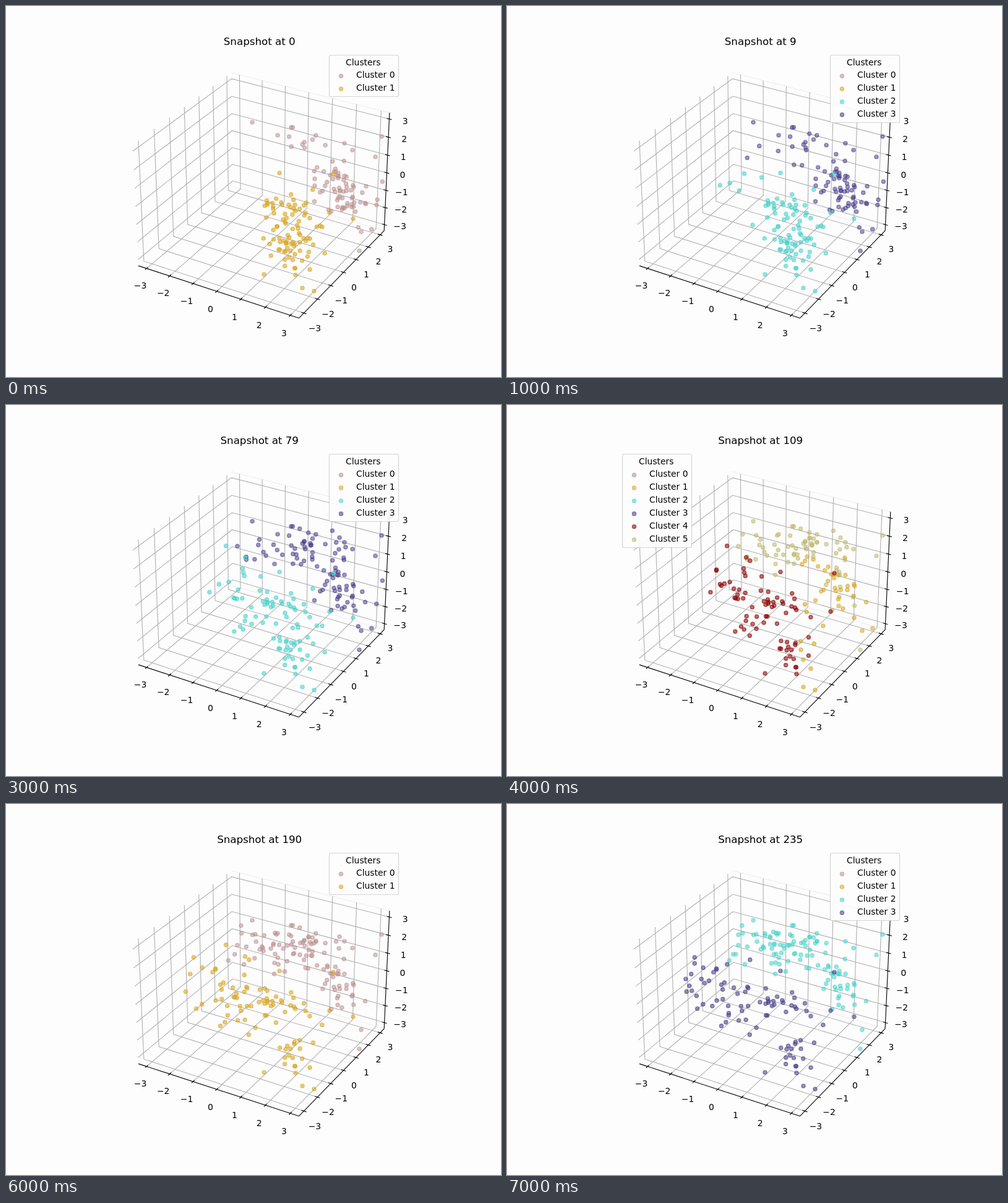
Write an HTML page that moves like this. It is 800x600 px and loops after 8000 ms.

```html
<!DOCTYPE html>
<html lang="en">
<head>
<meta charset="utf-8">
<title>Cluster snapshots</title>
<style>
html, body { margin: 0; width: 100%; height: 100%; overflow: hidden; background: #fdfdfd; }
svg { display: block; width: 800px; height: 600px; }
text { font: 13.89px "DejaVu Sans", sans-serif; fill: #000; }
.title { font-size: 16.67px; }
.grid { stroke: #b0b0b0; stroke-width: 1.11; fill: none; }
.pane { stroke: #efefef; stroke-width: 1.2; fill: none; }
.axis { stroke: #000; stroke-width: 1.11; fill: none; }
</style>
</head>
<body>
<svg viewBox="0 0 800 600">
  <g id="axes"></g>
  <g id="dots"></g>
  <g id="legend"></g>
  <text id="title" class="title" x="409.7" y="63" text-anchor="middle"></text>
</svg>
<script>
const STEP = 1000;
const colors = ["#bc8f8f", "#daa520", "#48d1cc", "#483d8b", "#8b0000", "#bdb76b"];

// Per snapshot: label and cluster of the upper, lower and right-hand group
const shots = [
  { at: 0, up: 0, low: 1 },
  { at: 9, up: 3, low: 2 },
  { at: 39, up: 4, low: 1 },
  { at: 79, up: 3, low: 2 },
  { at: 109, up: 5, low: 4, right: 1 },
  { at: 146, up: 3, low: 2 },
  { at: 190, up: 0, low: 1 },
  { at: 235, up: 2, low: 3 }
];

const byId = id => document.getElementById(id);
const line = (cls, ...pts) =>
  `<polyline class="${cls}" points="${pts.map(p => p.map(v => v.toFixed(2)).join()).join(" ")}"/>`;
const label = (s, x, y, anchor = "middle") => `<text x="${x}" y="${y}" text-anchor="${anchor}">${s}</text>`;
const dot = (x, y, c, a) =>
  `<circle cx="${x.toFixed(1)}" cy="${y.toFixed(1)}" r="3.1" fill="${c}" stroke="${c}" ` +
  `stroke-width="1.39" fill-opacity="${a}" stroke-opacity="${a}"/>`;

// ---- Axes: perspective view of a box with sides from -0.5 to 0.5 ----
const WIDE = 1.19, TALL = 0.893, DIST = 10, SCALE = 2497;
const rad = Math.PI / 180;
const [ce, se] = [Math.cos(30 * rad), Math.sin(30 * rad)];
const [ca, sa] = [Math.cos(-60 * rad), Math.sin(-60 * rad)];

function project([x, y, z]) {
  x *= WIDE; y *= WIDE; z *= TALL;
  const out = x * ca + y * sa;
  const k = SCALE / (DIST - out * ce - z * se);
  return [416.2 + (y * ca - x * sa) * k, 296.8 - (z * ce - out * se) * k];
}

const shift = (p, dir, d) => p.map((v, i) => v + dir[i] * d);
const h = 0.5;
// Path of a grid line at f, tick direction, label direction
const axes = [
  { path: f => [[f, -h, -h], [f, h, -h], [f, h, h]], tick: [0, 1, 0], out: [0, -1, -1] },
  { path: f => [[h, f, -h], [-h, f, -h], [-h, f, h]], tick: [1, 0, 0], out: [1, 0, -1] },
  { path: f => [[h, h, f], [-h, h, f], [-h, -h, f]], tick: [1, 0, 0], out: [1, 1, 0] }
];

function drawAxes() {
  let grid = "", marks = "", names = "";
  for (const { path, tick, out } of axes) {
    marks += line("axis", project(path(-h)[0]), project(path(h)[0]));
    for (let v = -3; v <= 3; v++) {
      const pts = path((v + 3.36) / 6.7 - h);
      grid += line("grid", ...pts.map(project));
      marks += line("axis", project(shift(pts[0], tick, -0.015)), project(shift(pts[0], tick, 0.015)));
      const [x, y] = project(shift(pts[0], out, 0.065));
      names += label(v < 0 ? "\u2212" + -v : v, x.toFixed(1), Math.round(y + 11.3));
    }
  }
  const top = [[-h, h, h], [h, h, h]], bottom = [[-h, h, -h], [h, h, -h]];
  const panes = [top, bottom].map(e => line("pane", ...e.map(project))).join("");
  byId("axes").innerHTML = panes + grid + marks + names;
}

// ---- Points ----
function randomizer(seed) {
  return () => {
    seed = (seed + 0x6d2b79f5) | 0;
    let v = Math.imul(seed ^ (seed >>> 15), 1 | seed);
    v = (v + Math.imul(v ^ (v >>> 7), 61 | v)) ^ v;
    return ((v ^ (v >>> 14)) >>> 0) / 4294967296;
  };
}
const rnd = randomizer(17);
const bell = () => (rnd() + rnd() - 1) * 2;

const inRight = (x, y) => x > 470 && y > 245 && rnd() < 0.6;
const always = () => [0, Infinity];
const leaving = k => [0, 0.5 + 4 * k];
const arriving = k => [0.5 + 6.5 * k, 4.7 + 6.5 * k];

// n points around at(k), k from 0 to 1 in order of age; slope tilts the cloud
function cloud(n, at, [sx, sy], slope, life) {
  return Array.from({ length: n }, (_, i) => {
    const k = i / n, [cx, cy] = at(k), dx = bell() * sx;
    const x = cx + dx, y = cy + slope * dx + bell() * sy;
    return { x, y, side: inRight(x, y), life: life(k) };
  });
}
const anchors = pts => pts.map(([x, y]) => ({ x, y, side: inRight(x, y), life: always() }));

const upper = [
  ...anchors([[607, 211], [398, 188], [597, 244], [571, 396], [574, 365], [439, 209], [547, 222], [560, 233]]),
  ...cloud(30, () => [548, 295], [32, 25], 0.4, always),
  ...cloud(10, () => [490, 222], [30, 14], 0.2, always),
  ...cloud(36, () => [545, 297], [33, 32], 0.4, leaving),
  ...cloud(96, k => [460 - 40 * k, 230 + 8 * k], [54, 24], 0.1, arriving)
];
const lower = [
  ...anchors([[498, 461], [479, 456], [417, 434], [468, 435], [529, 272], [442, 270], [561, 344], [523, 334]]),
  ...cloud(20, () => [462, 329], [28, 14], 0.2, always),
  ...cloud(17, () => [466, 399], [24, 20], 0.2, always),
  ...cloud(48, () => [466, 366], [30, 42], 0.2, leaving),
  ...cloud(72, k => [388 - 63 * k * k, 308], [32, 38], 0.35, arriving)
];

function drawDots(s) {
  const { up, low, right } = shots[s];
  const paint = (pts, own, alpha) => pts
    .filter(p => p.life[0] <= s && s < p.life[1])
    .map(p => dot(p.x, p.y, colors[p.side ? right ?? own : own], alpha)).join("");
  byId("dots").innerHTML = paint(upper, up, 0.53) + paint(lower, low, 0.57);
}

function drawLegend(s) {
  const { up, low, right = 0 } = shots[s];
  const n = Math.max(up, low, right) + 1;
  const x = n > 4 ? 186.5 : 522.5;
  let out = `<rect x="${x}" y="79.5" width="112" height="${25 + 21 * n}" rx="2.8" ` +
    `fill="#fdfdfd" fill-opacity=".92" stroke="#ccc" stroke-opacity=".8" stroke-width="1.2"/>`;
  out += label("Clusters", x + 54.8, 96);
  for (let i = 0; i < n; i++) {
    out += dot(x + 19, 113.2 + 20.9 * i, colors[i], 0.55);
    out += label("Cluster " + i, x + 43.5, 116 + 21 * i, "start");
  }
  byId("legend").innerHTML = out;
}

let shown = -1;
function update(t) {
  const s = Math.floor(t / STEP) % shots.length;
  if (s === shown) return;
  shown = s;
  byId("title").textContent = "Snapshot at " + shots[s].at;
  drawDots(s);
  drawLegend(s);
}

drawAxes();
update(0);
const start = performance.now();
(function tick() {
  update(performance.now() - start);
  requestAnimationFrame(tick);
})();
</script>
</body>
</html>
```
